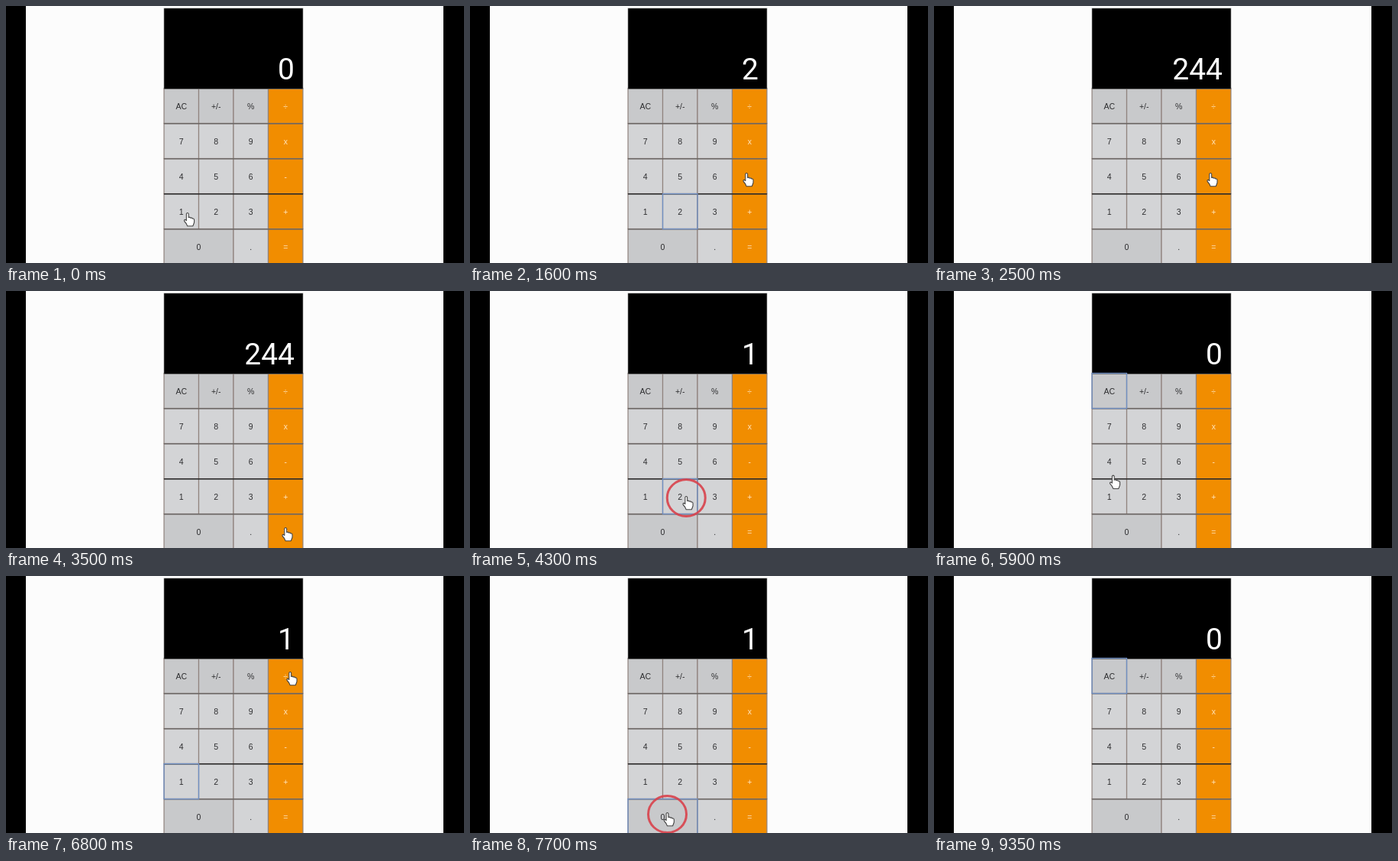
Animation of 600 by 336 pixels, one loop 9.4 s. Source, as an HTML page:

```html
<!DOCTYPE html>
<html lang="en">
<head>
<meta charset="utf-8">
<title>Calculator</title>
<style>
  html, body { margin: 0; width: 100%; height: 100%; overflow: hidden; background: #fcfcfc; }
  svg { display: block; width: 100%; height: 100%; }
  .key { font: 10.5px "Liberation Sans", Arial, sans-serif; text-anchor: middle; }
  #display { font: 39px Roboto, sans-serif; text-anchor: end; fill: #fff; }
</style>
</head>
<body>
<svg viewBox="0 0 600 336">
  <rect width="600" height="336" fill="#fcfcfc"/>
  <rect width="26" height="336"/>
  <rect x="573" width="27" height="336"/>
  <g id="keys"></g>
  <rect x="207" y="3" width="182" height="105.3" stroke="#777" stroke-width=".6"/>
  <text id="display" x="378" y="95.5">0</text>
  <rect id="focus" fill="none" stroke="#6f8fc4" stroke-width="1.3"/>
  <ellipse id="ring" rx="25" ry="24" fill="none" stroke="#d9424c" stroke-width="3" opacity=".9"/>
  <path id="hand" fill="#fff" stroke="#444" stroke-width="1.1" stroke-linejoin="round"
    d="M-1.4 1Q0-1 1.4 1V6Q3 5 4 6.6Q5.6 5.8 6.5 7.4Q8.6 7 8.8 9V12.5Q8 15 7 17.3H0Q-1 14-4 11Q-4.8 9-3 8.8L-1.4 10Z"/>
</svg>
<script>
const LOOP = 9400, RELEASE = 120, RING = 200, EXIT = 9320;
const SETTLE = 80, MS_PER_PX = 1.5;
const LEFT = 207, TOP = 107.5, COL = 45.5, ROW = 46;
const $ = id => document.getElementById(id);

function set(node, attrs) {
  for (const name in attrs) node.setAttribute(name, attrs[name]);
}

function show(node, visible, attrs) {
  set(node, { visibility: visible ? "visible" : "hidden", ...(visible && attrs) });
}

function add(tag, attrs, text = "") {
  const node = document.createElementNS("http://www.w3.org/2000/svg", tag);
  set(node, attrs);
  node.textContent = text;
  $("keys").append(node);
}

const keys = {};
["AC +/- % ÷", "7 8 9 x", "4 5 6 -", "1 2 3 +", "0 . ="].forEach((line, r) => {
  const y = TOP + r * ROW;
  let x = LEFT;
  for (const label of line.split(" ")) {
    const orange = "÷x-+=".includes(label);
    const width = label === "0" ? 2 * COL : COL;
    const fill = orange ? "#f18d00" : r === 0 || label === "0" ? "#c8c9cb" : "#d3d4d6";
    keys[label] = { box: { x, y, width, height: ROW }, orange };
    add("rect", { ...keys[label].box, fill, stroke: "#8f827d", "stroke-width": 1.2 });
    add("text", {
      class: "key", x: x + width / 2, y: y + 27.3, fill: orange ? "#ffe6c0" : "#2d2d2f"
    }, label);
    x += width;
  }
  add("path", {
    d: `M${LEFT} ${y + .2}h${4 * COL}`, stroke: r === 3 ? "#252525" : "#6a6563", "stroke-width": 1.5
  });
});

// Bursts of presses: start, gap, labels, pointer offset from the key
const bursts = [
  [130, 310, "1 2 2 x", 8, 6],
  [1370, 310, "2 -", -4, 0],
  [3100, 0, "=", 0, -1],
  [3750, 250, "- 1 2 0 =", 8, 4],
  [5430, 0, "AC", 0, 4],
  [6033, 783, "1 ÷ 0 = AC", 6, -1]
];

const compute = {
  "÷": (a, b) => b ? a / b : 0,
  "x": (a, b) => a * b,
  "-": (a, b) => a - b
};

function calculator() {
  let total = 0, entry = null, operator = null;
  return label => {
    if (label === "AC") {
      total = 0;
      entry = operator = null;
    } else if (/\d/.test(label)) {
      entry = (entry ?? 0) * 10 + Number(label);
    } else {
      if (entry !== null) total = operator ? compute[operator](total, entry) : entry;
      entry = null;
      operator = label === "=" ? null : label;
    }
    return entry ?? total;
  };
}

const enter = calculator();
const presses = bursts.flatMap(([start, gap, labels, dx, dy]) =>
  labels.split(" ").map((label, i) => {
    const { box, orange } = keys[label];
    return {
      time: start + i * gap, box, orange, value: enter(label),
      x: box.x + box.width / 2 + dx, y: box.y + box.height / 2 - 4 + dy
    };
  }));

// The pointer rests on a key, then moves in time for the next press.
function pointerAt(t) {
  const i = presses.findLastIndex(p => p.time + RELEASE <= t);
  const from = presses[Math.max(i, 0)];
  const to = presses[i + 1] ?? from;
  const arrive = to.time - SETTLE;
  const travel = MS_PER_PX * Math.hypot(to.x - from.x, to.y - from.y);
  const depart = Math.max(from.time + RELEASE, arrive - travel);
  const u = to === from ? 0 : Math.min(1, Math.max(0, (t - depart) / (arrive - depart)));
  const eased = u * u * (3 - 2 * u);
  return { x: from.x + (to.x - from.x) * eased, y: from.y + (to.y - from.y) * eased };
}

function draw(t) {
  const pressed = presses.findLast(p => p.time <= t);
  const released = presses.findLast(p => p.time + RELEASE <= t);
  const tip = pointerAt(t), present = t < EXIT;
  $("display").textContent = released ? released.value : 0;
  show($("focus"), pressed && !pressed.orange, pressed?.box);
  show($("hand"), present, { transform: `translate(${tip.x} ${tip.y})` });
  show($("ring"), present && pressed && t - pressed.time < RING, { cx: tip.x, cy: tip.y + 2 });
}

const start = performance.now();
function tick(now) {
  draw(Math.max(0, now - start) % LOOP);
  requestAnimationFrame(tick);
}
draw(0);
requestAnimationFrame(tick);
</script>
</body>
</html>
```
